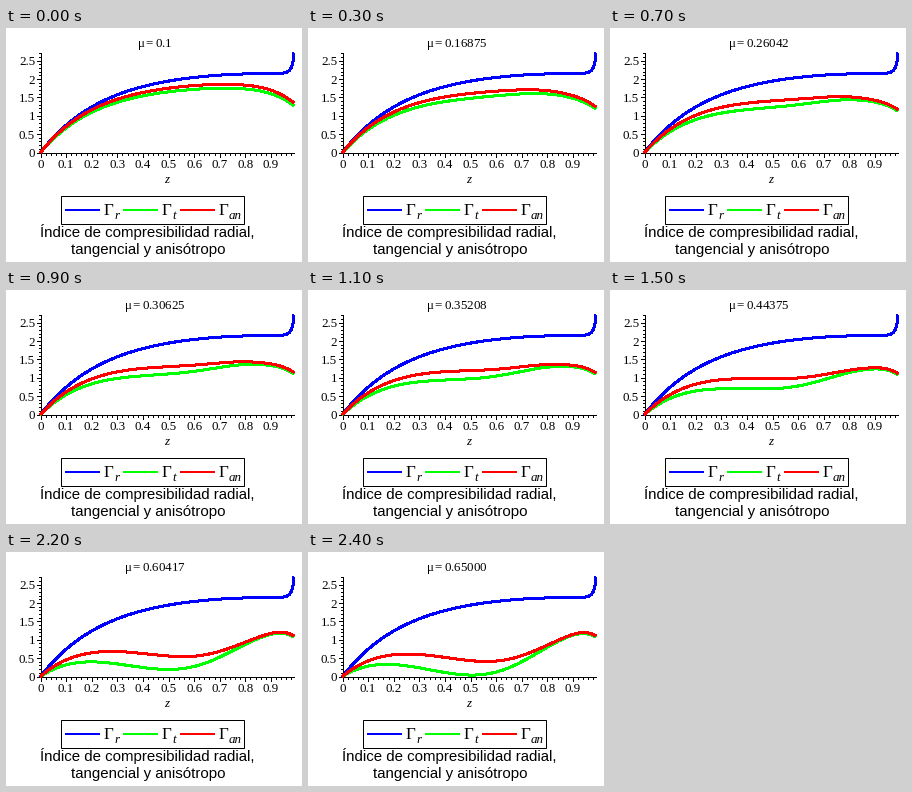
These frames come from a looping animation (296x234 px, 2500 ms). A matplotlib script:

```python
import numpy as np
import matplotlib.pyplot as plt
from matplotlib.animation import FuncAnimation
from matplotlib.patches import Rectangle

W, H, DPI = 296, 234, 64
PX = 72 / DPI                      # points per pixel
FRAMES, INTERVAL = 25, 100
MU0, MU1 = 0.1, 0.65
X0, Y0, XS, YS = 34.5, 124.5, 256, 36.7
Z_END, TOP = 0.99, 2.71

SERIF, SANS = "Liberation Serif", "Liberation Sans"
BLUE, GREEN, RED = "#0000ff", "#00ff00", "#ff0000"

plt.rcParams.update({"mathtext.fontset": "custom", "mathtext.rm": SERIF,
                     "mathtext.it": SERIF + ":italic"})

z = np.linspace(0, Z_END, 300)


def rise(level, rate, drop, power):
    """Saturating growth that falls off towards z = 1."""
    return level * (1 - np.exp(-rate * z)) - drop * z ** power


def sag(t, slope, n, b, edge):
    """Loss as mu grows: a steady broad dip and a quick one near the edge."""
    dip = slope * z * (1 - z ** n) ** b
    rim = edge * np.exp(-((z - 0.93) / 0.15) ** 2)
    return dip * t * (0.85 + 0.15 * t) + rim * (1 - np.exp(-4.5 * t))


def radial():
    return rise(2.25, 4, 0.15, 8) + 0.00102 * ((1 - z) ** -1.4 - 1)


def anisotropic(t):
    return rise(1.96, 4.5, 0.65, 10) - sag(t, 2.86, 5, 2.5, 0.29)


def tangential(t):
    return 0.943 * rise(1.96, 4.5, 0.65, 10) - sag(t, 3.88, 3.7, 2.3, 0.23)


def to_y(v):
    return Y0 - YS * v


fig = plt.figure(figsize=(W / DPI, H / DPI), dpi=DPI, facecolor="white")
ax = fig.add_axes([0, 0, 1, 1])
ax.set(xlim=(0, W), ylim=(H, 0))
ax.axis("off")


def text(x, y, s, size=13, font=SERIF, ha="center", style="normal"):
    return ax.text(x, y, s, fontsize=size * PX, family=font, ha=ha,
                   va="baseline", style=style, color="black")


def line(x, y, color="black", width=1):
    return ax.plot(x, y, color=color, lw=width * PX, antialiased=False,
                   solid_capstyle="butt", solid_joinstyle="round")[0]


def curve(values, color):
    return line(X0 + XS * z, to_y(values), color, 2)


def draw_axes():
    line([X0, X0 + XS * Z_END], [Y0, Y0])
    line([X0, X0], [Y0, to_y(TOP)])
    for i in range(50):
        x = X0 + XS * i / 50
        line([x, x], [Y0, Y0 + (2 if i % 5 else 4)])
        if i % 5 == 0:
            text(x, 140, f"{i / 50:g}")
    for i in range(28):
        y = to_y(i / 10)
        line([X0 - (2 if i % 5 else 4), X0], [y, y])
        if i % 5 == 0:
            text(29, y + 4.5, f"{i / 10:g}", ha="right")
    text(161, 155, "z", style="italic")


def draw_legend():
    ax.add_patch(Rectangle((54.5, 167.5), 183, 28, fill=False,
                           ec="black", lw=PX))
    for x, color, sub in ((59, BLUE, "r"), (117, GREEN, "t"), (174, RED, "an")):
        line([x, x + 35], [182, 182], color, 2)
        text(x + 39, 187, "Γ", size=17, ha="left")
        text(x + 49, 191, sub, ha="left", style="italic")


draw_axes()
draw_legend()
text(141.5, 209, "Índice de compresibilidad radial,", 15, SANS)
text(142, 226, "tangencial y anisótropo", 15, SANS)

curve(radial(), BLUE)
green = curve(tangential(0), GREEN)
red = curve(anisotropic(0), RED)
title = text(149, 19, "")


def update(i):
    t = i / (FRAMES - 1)
    mu = MU0 + (MU1 - MU0) * t
    value = f"{mu:.5f}" if i else f"{mu:g}"
    title.set_text(rf"$\mathrm{{μ}}={value}$")
    green.set_ydata(to_y(tangential(t)))
    red.set_ydata(to_y(anisotropic(t)))
    return title, green, red


anim = FuncAnimation(fig, update, frames=FRAMES, interval=INTERVAL,
                     repeat=True, repeat_delay=0, blit=False)
plt.show()
```
